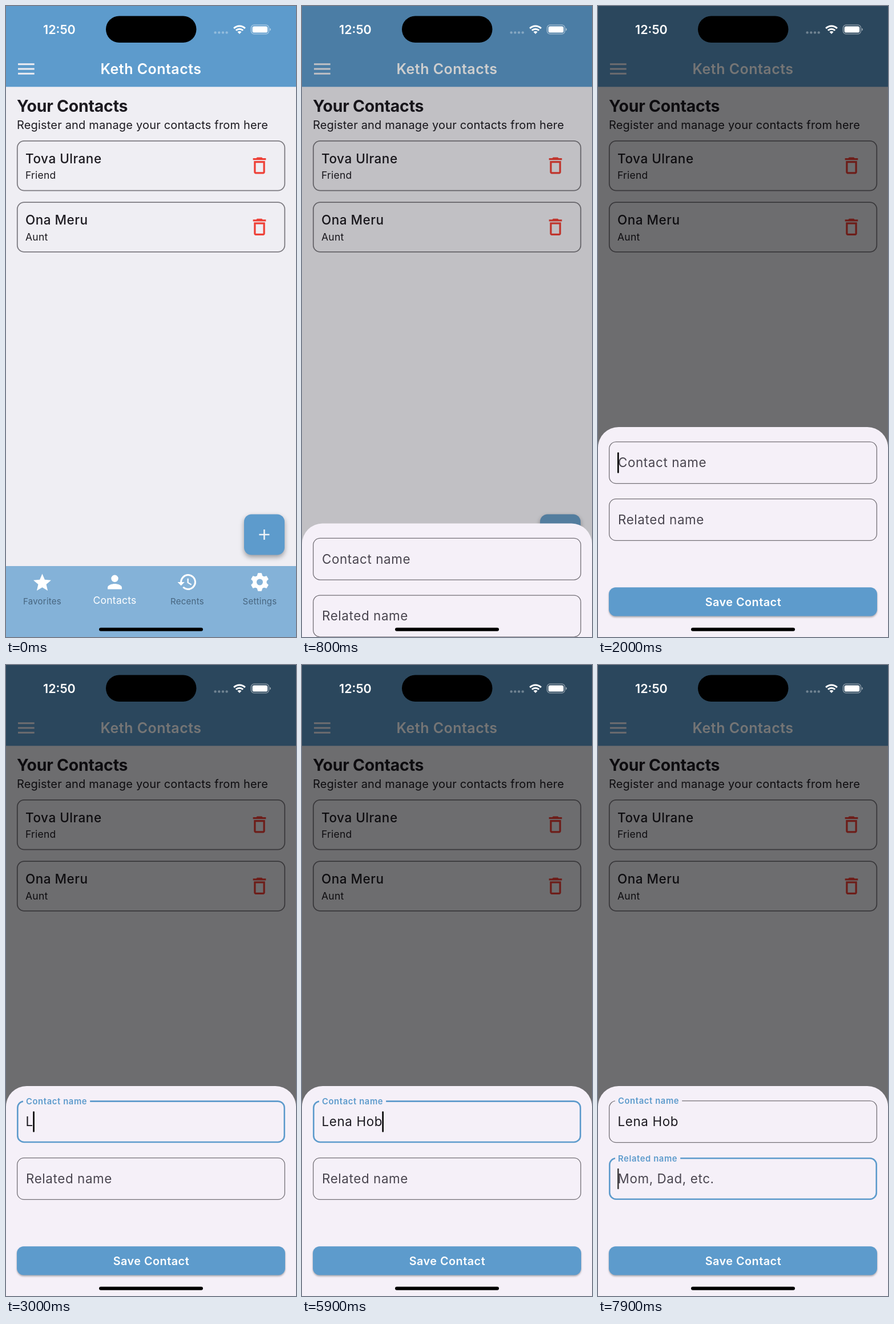
Animation of 508 by 1103 pixels, one loop 8000 ms. Source, as an HTML page:

```html
<!DOCTYPE html>
<html lang="en">
<head>
<meta charset="utf-8">
<title>Contacts</title>
<style>
html, body { margin: 0; width: 100%; height: 100%; overflow: hidden; background: #efeef3; }
svg { display: block; width: 100vw; height: 100vh; }
text { font-family: Inter, Roboto, sans-serif; white-space: pre; font-kerning: normal; }
.mid { text-anchor: middle; }
.lift { filter: drop-shadow(0 2px 1.5px rgba(0, 0, 0, .3)); }
.fab { filter: drop-shadow(0 4px 4px rgba(0, 0, 0, .35)); }
</style>
</head>
<body>
<svg id="stage" viewBox="0 0 508 1103" preserveAspectRatio="none"></svg>
<script>
const LOOP = 8000, W = 508, H = 1103, SHEET = 367;
const BLUE = '#5d9bcc', INK = '#1c1a20', PAPER = '#f5f0f8';
const TEXT = 22.4, SMALL = 14.8, TRACK = 0.6;

const ICONS = {
  trash: 'M6 19c0 1.1.9 2 2 2h8c1.1 0 2-.9 2-2V7H6v12zM8 9h8v10H8V9zm7.5-5l-1-1h-5l-1 1H5v2h14V4z',
  star: 'M12 17.27L18.18 21l-1.64-7.03L22 9.24l-7.19-.61L12 2 9.19 8.63 2 9.24l5.46 4.73L5.82 21z',
  person: 'M12 12a4 4 0 1 0 0-8 4 4 0 0 0 0 8zm0 2c-2.67 0-8 1.34-8 4v2h16v-2c0-2.66-5.33-4-8-4z',
  recent: 'M13 3a9 9 0 0 0-9 9H1l3.89 3.89.07.14L9 12H6a7 7 0 1 1 2.06 4.94l-1.42 1.42A9 9 0 1 0 13 3zm-1 5v5l4.28 2.54.72-1.21-3.5-2.08V8H12z',
  plus: 'M19 13h-6v6h-2v-6H5v-2h6V5h2v6h6v2z'
};

const lerp = (a, b, p) => a + (b - a) * p;
const clamp = p => Math.min(1, Math.max(0, p));
const span = (t, start, length) => clamp((t - start) / length);

// CSS-style cubic easing, solved by bisection
function bezier(x1, y1, x2, y2) {
  const at = (a, b, s) => 3 * (1 - s) * (1 - s) * s * a + 3 * (1 - s) * s * s * b + s * s * s;
  return x => {
    if (x <= 0 || x >= 1) return clamp(x);
    let lo = 0, hi = 1;
    for (let i = 0; i < 24; i++) {
      const s = (lo + hi) / 2;
      if (at(x1, x2, s) < x) lo = s; else hi = s;
    }
    return at(y1, y2, lo);
  };
}
const ease = bezier(.25, .1, .25, 1);
const decelerate = bezier(0, 0, .2, 1);
const standard = bezier(.4, 0, .2, 1);

function mix(a, b, p) {
  const c = a.map((v, i) => Math.round(lerp(v, b[i], p)));
  return `rgb(${c})`;
}
const GREY = [116, 112, 119], LABEL = [73, 69, 79], ACCENT = [93, 155, 204];

// Markup helpers
const text = (x, y, size, str, { w = 400, ls = 0, fill = INK, cls = '', id = '' } = {}) =>
  `<text id="${id}" class="${cls}" x="${x}" y="${y}" font-size="${size}" font-weight="${w}" letter-spacing="${ls}" fill="${fill}">${str}</text>`;
const rect = (x, y, w, h, r, attrs) =>
  `<rect x="${x}" y="${y}" width="${w}" height="${h}" rx="${r}" ${attrs}/>`;
const icon = (name, cx, cy, k, fill) =>
  `<path transform="translate(${cx - 12 * k} ${cy - 12 * k}) scale(${k})" d="${ICONS[name]}" fill="${fill}"/>`;

function gear(cx, cy) {
  let teeth = '';
  for (let i = 0; i < 6; i++)
    teeth += `<path d="M-4.4 -10 L-3 -15.3 H3 L4.4 -10 Z" stroke="#fff" stroke-width="1" stroke-linejoin="round" transform="rotate(${i * 60})"/>`;
  return `<g transform="translate(${cx} ${cy})" fill="#fff">${teeth}
    <circle r="8.8" fill="none" stroke="#fff" stroke-width="6.6"/></g>`;
}

function wifi(cx, cy) {
  const arc = r => {
    const d = r * Math.SQRT1_2;
    return `M${cx - d} ${cy - d}A${r} ${r} 0 0 1 ${cx + d} ${cy - d}`;
  };
  return `<path d="${arc(13.9)}${arc(8.7)}" fill="none" stroke="#fff" stroke-width="3.1"/>
    <path d="${arc(5)}L${cx} ${cy}Z" fill="#fff"/>`;
}

const card = (y, name, relation) =>
  rect(19.8, y, 468.5, 86.8, 12, 'fill="none" stroke="#7d7b81" stroke-width="1.8"') +
  text(34, y + 39, 22.5, name, { w: 500, ls: .5 }) +
  text(34, y + 66.5, 17.5, relation, { ls: .25 }) +
  icon('trash', 444, y + 43.2, 1.62, '#ee4037');

const tab = (x, label) => text(x, 1046.2, 15, label, { ls: .25, fill: '#47657f', cls: 'mid' });

const field = (id, y, label) => `<g transform="translate(0 ${y})">
  <rect id="${id}Box" fill="none"/>
  ${rect(30, -2, 0, 8, 0, `id="${id}Gap" fill="${PAPER}"`)}
  ${text(35, 45, TEXT, label, { ls: TRACK, id: id + 'Label' })}
  ${text(34.6, 45, TEXT, '', { ls: TRACK, id: id + 'Text' })}
  ${rect(34, 18.9, 2.6, 36.4, 1, `id="${id}Caret" fill="#000"`)}
</g>`;

const stage = document.getElementById('stage');
stage.innerHTML = `
  ${rect(0, 0, W, H, 0, 'fill="#efeef3"')}
  ${rect(0, 0, W, 141.3, 0, `fill="${BLUE}"`)}
  <path d="M21 101.7H49.7M21 110H49.7M21 118.2H49.7" stroke="#eeedf2" stroke-width="2.9"/>
  ${text(254, 118.8, 25, 'Keth Contacts', { w: 600, ls: .45, fill: '#fff', cls: 'mid' })}
  ${text(19, 184.6, 28.4, 'Your Contacts', { w: 700, ls: -.2 })}
  ${text(19, 215, 20, 'Register and manage your contacts from here', { ls: .18 })}
  ${card(235.8, 'Tova Ulrane', 'Friend')}
  ${card(343.1, 'Ona Meru', 'Aunt')}
  <clipPath id="fabClip">${rect(417, 888.5, 71, 71, 13, '')}</clipPath>
  ${rect(417, 888.5, 71, 71, 13, `class="fab" fill="${BLUE}"`)}
  <g clip-path="url(#fabClip)" fill="#9a9a9a">
    ${rect(417, 888.5, 71, 71, 0, 'id="press"')}
    <circle id="ripple" cx="452.5" cy="924"/>
  </g>
  ${icon('plus', 452.4, 924, 1.29, '#eef3f8')}
  ${rect(0, 979, W, 124, 0, 'fill="#84b2d8"')}
  ${icon('star', 63.5, 1008, 1.55, '#fff')}
  ${icon('person', 190.5, 1007, 1.55, '#fff')}
  ${icon('recent', 317.5, 1007, 1.55, '#fff')}
  ${gear(444.5, 1007)}
  ${tab(63.5, 'Favorites')}${tab(317.5, 'Recents')}${tab(444.5, 'Settings')}
  ${text(190.5, 1045, 17.5, 'Contacts', { ls: .25, fill: '#fff', cls: 'mid' })}
  ${rect(0, 0, W, H, 0, 'id="scrim" fill="#000"')}
  <g id="sheet">
    ${rect(0, 0, W, 480, 36, `fill="${PAPER}"`)}
    ${field('name', 25.3, 'Contact name')}
    ${field('kin', 125, 'Related name')}
    ${rect(19, 280.3, 470, 50.3, 12, `class="lift" fill="${BLUE}"`)}
    ${text(254.4, 312.6, 19.8, 'Save Contact', { w: 600, ls: .5, fill: '#fff', cls: 'mid' })}
  </g>
  ${text(93.4, 49, 21.5, '12:50', { w: 600, fill: '#fff', cls: 'mid' })}
  ${rect(175, 17.5, 158.5, 46.5, 23.25, 'fill="#000"')}
  ${[0, 1, 2, 3].map(i => `<circle cx="${366.6 + i * 6.7}" cy="46.4" r="2.2" fill="#fff" opacity=".33"/>`).join('')}
  ${wifi(409, 48.9)}
  ${rect(429.4, 33.2, 31, 15.6, 5, 'fill="none" stroke="#fff" stroke-opacity=".5" stroke-width="1.3"')}
  ${rect(431.6, 35.4, 26.6, 11.2, 3.2, 'fill="#fff"')}
  <path d="M462 38.4q2 .8 2 2.6t-2 2.6z" fill="#fff" opacity=".5"/>
  ${rect(163, 1086.8, 182, 6, 3, 'fill="#000"')}`;

const el = {};
stage.querySelectorAll('[id]').forEach(n => { if (n.id) el[n.id] = n; });
const set = (id, attrs) => { for (const k in attrs) el[id].setAttribute(k, attrs[k]); };

const NAME = 'Lena Hob', HINT = 'Mom, Dad, etc.';
const KEYS = [2780, 3180, 3480, 3780, 4080, 4780, 4980, 5480];
const FOCUS = 1995, SWITCH = 6335;

// Caret: lit for half a second, then fades in four steps and comes back
function blink(ms) {
  const p = Math.max(0, ms) % 1000;
  const down = p < 500 ? 0 : Math.floor((p - 500) / 37.5) + 1;
  const up = p < 850 ? 0 : Math.floor((p - 850) / 37.5) + 1;
  return clamp(1 - Math.min(4, down) / 4 + Math.min(4, up) / 4);
}

// The border grows inwards from a fixed outer edge
function drawBorder(id, focus) {
  const line = lerp(1.3, 2.6, focus);
  set(id, {
    x: 19 + line / 2, y: line / 2, width: 470 - line, height: 74 - line, rx: 12.6 - line / 2,
    stroke: mix(GREY, ACCENT, focus), 'stroke-width': line
  });
}

function drawField(id, { float, focus, value, color, opacity, caret }) {
  const label = el[id + 'Label'], typed = el[id + 'Text'];
  drawBorder(id + 'Box', focus);
  set(id + 'Label', {
    y: lerp(45, 6.1 + focus, float),
    'font-size': lerp(TEXT, SMALL, float),
    'font-weight': float > .5 ? 600 : 400,
    fill: mix(LABEL, ACCENT, float)
  });
  set(id + 'Gap', { width: float > 0 ? (label.getComputedTextLength() + 10) * float : 0 });
  if (typed.textContent !== value) typed.textContent = value;
  set(id + 'Text', { fill: color, opacity });
  set(id + 'Caret', { opacity: caret });
}

function render(t) {
  const open = span(t, 741, 266);
  set('scrim', { opacity: .54 * ease(open) });
  set('sheet', { transform: `translate(0 ${H - SHEET * decelerate(open)})`, visibility: open ? 'visible' : 'hidden' });

  const press = span(t, 480, 150) * (1 - span(t, 800, 200));
  set('press', { opacity: .08 * press });
  set('ripple', { r: 52 * span(t, 480, 320), opacity: .1 * press });

  const typed = KEYS.filter(k => t >= k).length;
  const floatName = standard(span(t, FOCUS + 20, 167));
  const floatKin = standard(span(t, SWITCH, 167));
  const lastKey = typed ? KEYS[typed - 1] : 2010;
  const value = NAME.slice(0, typed);

  drawField('name', {
    float: floatName, focus: floatName - floatKin, value, color: INK, opacity: 1,
    caret: t >= FOCUS && t < SWITCH ? blink(t - lastKey) : 0
  });
  set('nameCaret', { x: 34 + (value ? el.nameText.getComputedTextLength() : 0) });
  drawField('kin', {
    float: floatKin, focus: floatKin, value: HINT, color: '#49454f', opacity: floatKin,
    caret: t >= SWITCH ? blink(t - 6385) : 0
  });
}

const begin = performance.now();
function tick() {
  render((performance.now() - begin) % LOOP);
  requestAnimationFrame(tick);
}
tick();
</script>
</body>
</html>
```
